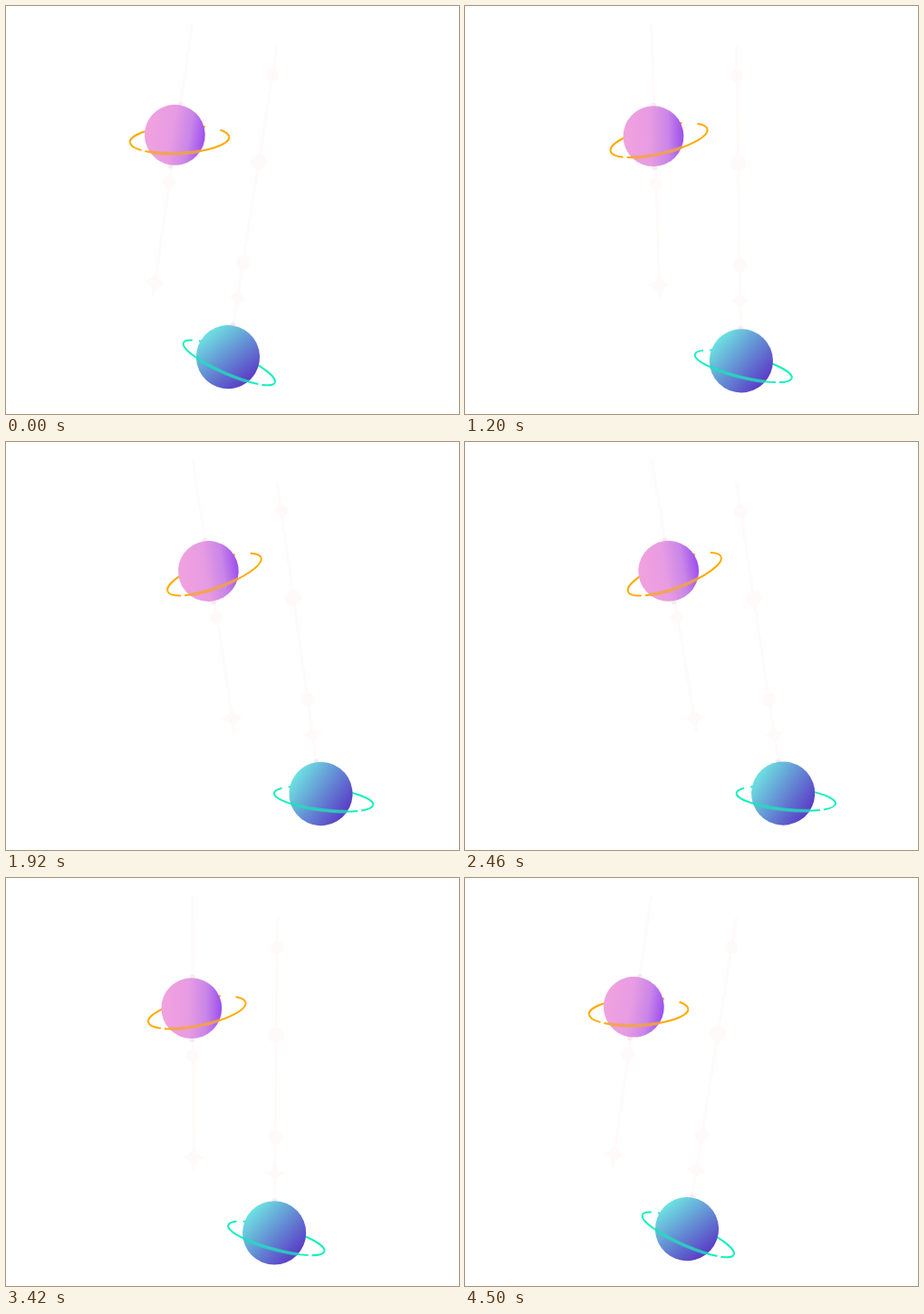
Write an HTML page with a canvas that moves like this. It is 500x450 px and loops after 4.59 s.

```html
<!DOCTYPE html>
<html lang="en">
<head>
<meta charset="utf-8">
<title>Swinging planets</title>
<style>
html, body { margin: 0; width: 100%; height: 100%; overflow: hidden; background: #fff; }
canvas { display: block; }
</style>
</head>
<body>
<canvas id="stage" width="500" height="450"></canvas>
<script>
const ctx = document.getElementById('stage').getContext('2d');
const LOOP = 4590, SWING = 4500, STEP = 30;
const FAINT = '#fffafa', PIN = '#f8eaf0';
const rad = deg => deg * Math.PI / 180;

const pendulums = [
  {
    pivot: [206, 18],
    cord: [-0.3, 1, 4.2, 306],
    beads: [[1.5, 178, 7.2]],
    star: [3.6, 290, 12.5],
    pins: [[0.8, 91.5], [0.8, 160.2]],
    planet: {
      y: 125.7, r: 33.4, axis: [-33, 0, 33, 0],
      colors: [[0, '#f1a2df'], [0.45, '#e79be2'], [0.75, '#c985e8'], [1, '#9d4fee']]
    },
    ring: {
      x: 6, y: 4.4, a: 54.8, b: 15, tilt: -12, color: '#ffaa00', band: '#f5a53c',
      back: [[180, 235], [298, 302], [326, 360]],
      front: [[0, 135], [141, 180]]
    }
  },
  {
    pivot: [299.4, 43.7],
    cord: [0, 0, 0, 313],
    beads: [[0, 33, 7.3], [0, 129.5, 9], [0, 242.5, 7.8]],
    star: [0, 282, 11.5],
    pins: [[0, 312.2]],
    planet: {
      y: 347.7, r: 35.1, axis: [-26, -24, 26, 24],
      colors: [[0, '#6ee2e2'], [1, '#5a3ac6']]
    },
    ring: {
      x: 2.3, y: 6, a: 55, b: 12.4, tilt: 14.7, color: '#14efbd', band: '#26dcbe',
      back: [[180, 211], [223, 232], [300, 360]],
      front: [[0, 39], [45, 180]]
    }
  }
];

function disc(x, y, r, fill) {
  ctx.fillStyle = fill;
  ctx.beginPath();
  ctx.arc(x, y, r, 0, 2 * Math.PI);
  ctx.fill();
}

// Four points joined by inward curves.
function drawStar([x, y, r]) {
  const c = r * 0.22;
  ctx.fillStyle = FAINT;
  ctx.beginPath();
  ctx.moveTo(x, y - r);
  ctx.quadraticCurveTo(x + c, y - c, x + r, y);
  ctx.quadraticCurveTo(x + c, y + c, x, y + r);
  ctx.quadraticCurveTo(x - c, y + c, x - r, y);
  ctx.quadraticCurveTo(x - c, y - c, x, y - r);
  ctx.fill();
}

function drawArcs({ x, y, a, b, tilt }, arcs, color, width) {
  ctx.strokeStyle = color;
  ctx.lineWidth = width;
  for (const [from, to] of arcs) {
    ctx.beginPath();
    ctx.ellipse(x, y, a, b, rad(tilt), rad(from), rad(to));
    ctx.stroke();
  }
}

function drawPlanet({ y, r, axis, colors }, ring) {
  ctx.save();
  ctx.translate(0, y);
  drawArcs(ring, ring.back, ring.color, 2);
  drawArcs(ring, ring.front, ring.color, 2);
  const shade = ctx.createLinearGradient(...axis);
  colors.forEach(stop => shade.addColorStop(...stop));
  disc(0, 0, r, shade);

  // The ring is wider and softer where it crosses the planet.
  ctx.beginPath();
  ctx.arc(0, 0, r, 0, 2 * Math.PI);
  ctx.clip();
  ctx.globalAlpha = 0.6;
  drawArcs(ring, [[0, 180]], ring.band, 4);
  drawArcs(ring, [[0, 180]], ring.band, 2.4);
  ctx.restore();
}

function drawPendulum(p, angle) {
  ctx.save();
  ctx.translate(...p.pivot);
  ctx.rotate(angle);
  const [x0, y0, x1, y1] = p.cord;
  ctx.strokeStyle = FAINT;
  ctx.lineWidth = 3;
  ctx.beginPath();
  ctx.moveTo(x0, y0);
  ctx.lineTo(x1, y1);
  ctx.stroke();
  p.beads.forEach(([x, y, r]) => disc(x, y, r, FAINT));
  drawStar(p.star);
  p.pins.forEach(([x, y]) => disc(x, y, 3, PIN));
  drawPlanet(p.planet, p.ring);
  ctx.restore();
}

function swingAngle(ms) {
  const t = Math.min(Math.floor(ms / STEP) * STEP, SWING);
  const u = 1 - Math.abs(1 - 2 * t / SWING);
  return rad(9 * (1 - 2 * u * u * (3 - 2 * u)));
}

const start = performance.now();
function draw() {
  const angle = swingAngle((performance.now() - start) % LOOP);
  ctx.fillStyle = '#fff';
  ctx.fillRect(0, 0, 500, 450);
  pendulums.forEach(p => drawPendulum(p, angle));
  requestAnimationFrame(draw);
}
draw();
</script>
</body>
</html>
```
